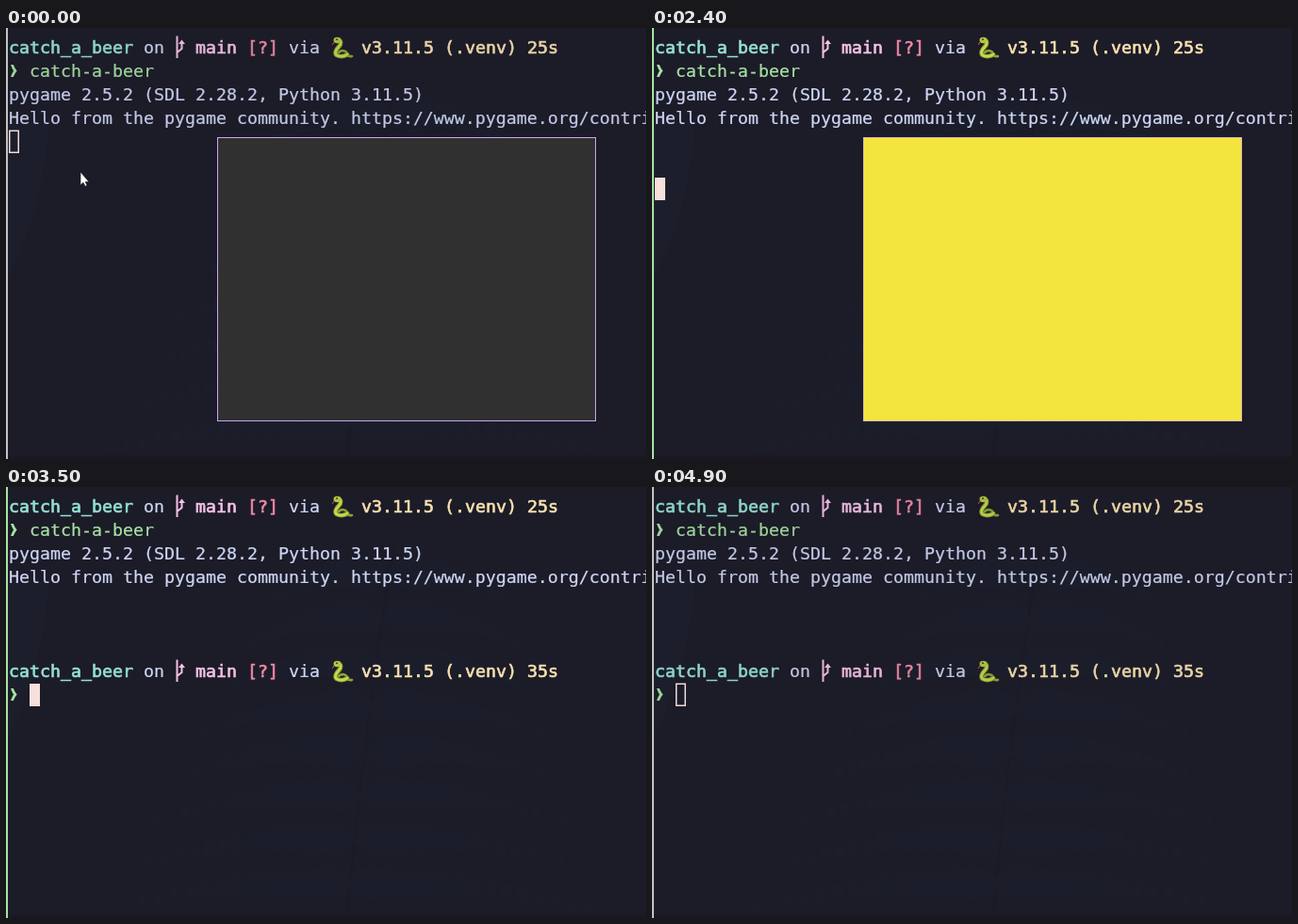
Write an HTML page that moves like this. It is 679 px wide and 458 px high and loops after 5100 ms.

```html
<!DOCTYPE html>
<html lang="en">
<head>
<meta charset="utf-8">
<title>Terminal game</title>
<style>
html, body { margin: 0; width: 100%; height: 100%; overflow: hidden; background: #1c1b28; }
svg { display: block; width: 679px; height: 458px; }
text { font: 18.27px "DejaVu Sans Mono", monospace; white-space: pre; stroke-width: .22px; }
.bold { stroke-width: .65px; }
</style>
</head>
<body>
<svg id="stage" viewBox="0 0 679 458" xmlns="http://www.w3.org/2000/svg">
  <rect width="679" height="458" fill="#1c1b28"/>
  <g id="fern" fill="#1b2b32" opacity=".2"></g>
  <path d="M0 100H46Q38 200 0 268Z" fill="#1b2f36" opacity=".22"/>
  <rect y="454" width="679" height="4" fill="#191824"/>
  <g id="term"></g>
  <g id="prompt"></g>
  <rect id="edge" width="2" height="458"/>
  <rect id="caret"/>
  <g id="win">
    <rect id="pane" x="224" y="116" width="402" height="302"/>
    <rect id="frame" x="224.5" y="116.5" width="401" height="301" fill="none"/>
  </g>
  <path id="arrow" d="M79 153V167L82 164.3L84 168.3L86 167.3L84.2 163.5H88Z" fill="#fff" stroke="#15151d" stroke-width=".6"/>
  <g id="beam" fill="none"></g>
</svg>
<script>
const LOOP = 5100, CELL = 11, ROW = 25;
const TEXT = '#cdd6f4', TEAL = '#94e2d5', PINK = '#f5c2e7', RED = '#f38ba8',
      YELLOW = '#f9e2af', GREEN = '#a6e3a1', ROSE = '#f7dfdb', MAUVE = '#cba6f7';
const $ = id => document.getElementById(id);
const colX = col => 3 + CELL * col;
const rowY = row => 9 + ROW * row;

function add(parent, tag, attrs) {
  const el = document.createElementNS('http://www.w3.org/2000/svg', tag);
  set(el, attrs);
  return parent.appendChild(el);
}

function set(el, attrs) {
  for (const key in attrs) el.setAttribute(key, attrs[key]);
}

function show(el, on) {
  el.style.display = on ? '' : 'none';
}

function write(parent, col, row, str, color, bold) {
  const attrs = { x: colX(col), y: rowY(row) + 18, fill: color, stroke: color };
  if (bold) attrs.class = 'bold';
  add(parent, 'text', attrs).textContent = str;
}

function branchIcon(parent, x, y) {
  const g = add(parent, 'g', { transform: `translate(${x} ${y})` });
  add(g, 'path', { d: 'M2.5 -.5V23M2.5 17L7.5 13V7', fill: 'none', stroke: PINK, 'stroke-width': 2 });
  add(g, 'path', { d: 'M4 8L7.5 3.5L11 8Z', fill: PINK });
}

// Upright neck with the head at the top, coil and tail along the base.
function snakeIcon(parent, x, y) {
  const g = add(parent, 'g', { transform: `translate(${x} ${y})`, fill: 'none', 'stroke-linecap': 'round' });
  const body = 'M8 4C12 4 12 8 9 11C6 14 4 18 7 20C11 22 16 21 18 19';
  const tail = 'M9 17C12 14 17 15 17.5 18C18 21 20 21.5 23 21';
  add(g, 'path', { d: tail, stroke: '#8aa435', 'stroke-width': 2.6 });
  add(g, 'path', { d: body, stroke: '#7f9a2b', 'stroke-width': 4.6 });
  add(g, 'path', { d: body, stroke: '#c9d552', 'stroke-width': 2.8 });
  add(g, 'ellipse', { cx: 7.5, cy: 4, rx: 4, ry: 3.2, fill: '#b4c542' });
  add(g, 'circle', { cx: 7, cy: 3.2, r: .9, fill: '#26301a' });
  add(g, 'path', { d: 'M4 6L2.5 8.5', stroke: '#e0504f', 'stroke-width': 1 });
}

function promptLines(parent, row, secs) {
  const y = rowY(row);
  write(parent, 0, row, 'catch_a_beer', TEAL, true);
  write(parent, 13, row, 'on', TEXT);
  branchIcon(parent, colX(16), y);
  write(parent, 18, row, 'main', PINK, true);
  write(parent, 23, row, '[?]', RED, true);
  write(parent, 27, row, 'via', TEXT);
  snakeIcon(parent, colX(31), y);
  write(parent, 34, row, 'v3.11.5 (.venv) ' + secs, YELLOW, true);
  add(parent, 'path', {
    transform: `translate(5 ${y + ROW + 5})`,
    d: 'M0 0H2.8Q4.4 4 6.6 6.5Q4.4 9 2.8 13H0Q1.4 9 3 6.5Q1.4 4 0 0Z', fill: GREEN
  });
}

// Faint fern: pairs of drooping fronds along a stem, each made of soft leaflets.
function drawFern() {
  const fern = $('fern');
  add(fern, 'path', { d: 'M412 60Q380 250 362 458', fill: 'none', stroke: '#14141d', 'stroke-width': 2 });
  for (let i = 0; i < 8; i++) {
    for (const side of [-1, 1]) {
      const x = 406 - i * 6, y = 92 + i * 47, len = 125 + i * 20;
      let d = '';
      for (let k = 0; k < 15; k++) {
        const u = k / 15, px = x + side * len * u, py = y - 10 * u + 42 * u * u;
        const size = 26 * (1 - u) + 6, tip = px + side * size * .9;
        for (const v of [-1, 1])
          d += `M${px} ${py}Q${px + side * 2} ${py + v * size * .5} ${tip} ${py + v * size * .6}Q${tip} ${py + v * 2} ${px + side * 12} ${py}Z`;
      }
      add(fern, 'path', { d });
    }
  }
}

function drawBeamShape() {
  const d = 'M-2.5-7H2.5M0-7V7M-2.5 7H2.5';
  add($('beam'), 'path', { d, stroke: '#111118', 'stroke-width': 2.2 });
  add($('beam'), 'path', { d, stroke: '#e8e8ec', 'stroke-width': 1 });
}

// Start time, pane fill, frame opacity, caret column and row.
const STATES = [
  { at: 0, pane: '#303030', line: 1, col: 0, row: 4 },
  { at: 1200, pane: '#3dd305', line: .75, col: 0, row: 5 },
  { at: 2400, pane: '#f3e53d', line: .65, col: 0, row: 6 },
  { at: 3200, pane: '#1c1b28', line: .06, col: 0, row: 7 },
  { at: 3300, pane: 'none', line: .025, col: 0, row: 7 },
  { at: 3400, pane: 'none', line: 0, col: 0, row: 7 },
  { at: 3500, pane: 'none', line: 0, col: 2, row: 8 }
];

function moveBeam(t) {
  const early = t >= 500 && t < 1200, late = t >= 4200 && t < 4600;
  show($('beam'), early || late);
  const u = late ? Math.floor((t - 4200) / 100) / 3 : 0;
  const x = early ? 78.5 : 65.5 - 30 * u ** 1.7;
  const y = early ? 153.5 : 134.5 - 128 * u ** 1.6;
  set($('beam'), { transform: `translate(${x} ${y})` });
}

function render(t) {
  const s = STATES.filter(state => state.at <= t).pop();
  const focus = t >= 500 && t < 4900;
  const dim = focus ? 1 : .93;

  set($('term'), { opacity: dim });
  set($('prompt'), { opacity: dim });
  set($('edge'), { fill: focus ? GREEN : '#c3c3c6' });
  show($('prompt'), t >= 3500);

  show($('win'), t < 3400);
  set($('pane'), { fill: s.pane });
  set($('frame'), { stroke: t < 3200 ? MAUVE : '#fff', 'stroke-opacity': s.line });

  const x = colX(s.col), y = rowY(s.row);
  set($('caret'), focus
    ? { x, y, width: 11, height: 24, fill: ROSE, stroke: 'none' }
    : { x: x + .75, y: y + .25, width: 9.5, height: 23, fill: 'none', stroke: '#efdad7', 'stroke-width': 1.5 });

  show($('arrow'), t < 500);
  moveBeam(t);
}

drawFern();
drawBeamShape();
promptLines($('term'), 0, '25s');
write($('term'), 2, 1, 'catch-a-beer', GREEN);
write($('term'), 0, 2, 'pygame 2.5.2 (SDL 2.28.2, Python 3.11.5)', TEXT);
write($('term'), 0, 3, 'Hello from the pygame community. https://www.pygame.org/contribute.html', TEXT);
promptLines($('prompt'), 7, '35s');

const start = performance.now();
function tick() {
  render((performance.now() - start) % LOOP);
  requestAnimationFrame(tick);
}
tick();
</script>
</body>
</html>
```
